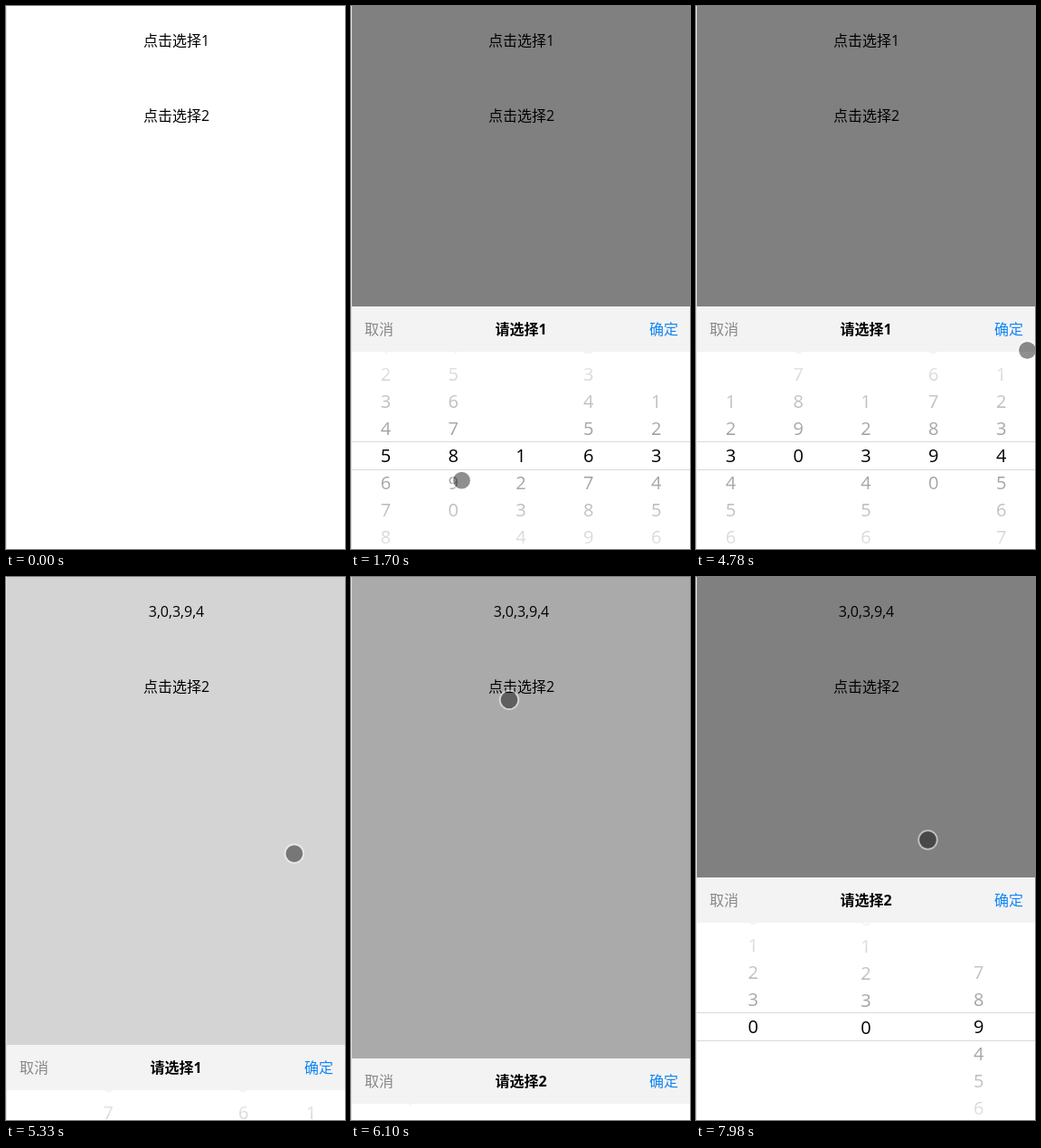
An HTML page with a canvas that plays this animation: 375 by 600 pixels, repeating every 8 s.

```html
<!DOCTYPE html>
<html lang="zh-CN">
<head>
<meta charset="utf-8">
<title>选择器</title>
<style>
  html, body { margin: 0; width: 100%; height: 100%; overflow: hidden; background: #fff; }
  canvas { display: block; }
</style>
</head>
<body>
<canvas id="stage" width="375" height="600"></canvas>
<script>
const ctx = document.getElementById('stage').getContext('2d');
const W = 375, H = 600, LOOP = 8000;
const FAMILY = '"Open Sans", "Noto Sans CJK SC", "Noto Sans CJK", sans-serif';

// The screen refreshes in fixed steps; all times below are in steps.
const STEP = 77.4, FIRST = 132;
const SLIDE = 3.9, FADE_LEAD = .75, DRAG = 3;

const PANEL_TOP = 332, PANEL_H = 280, HEAD = 50, ROW = 30, MID = 165;

// "drags" holds the start time of each column's drag.
const pickers = [
  { title: '请选择1', items: '1234567890', from: '58163', to: '30394',
    drags: [30, 21.5, 41.5, 47, 53.5], open: 11.235, close: 65.5 },
  { title: '请选择2', items: '7894561230', from: '249', to: '009',
    drags: [86.5, 92.5], open: 76.235, close: Infinity }
];

const clamp = v => Math.max(0, Math.min(1, v));
const mix = (a, b, p) => a + (b - a) * p;
const easeOut = p => 1 - (1 - p) ** 3;
const smooth = p => p * p * (3 - 2 * p);

// CSS "ease": cubic-bezier(.25, .1, .25, 1)
function ease(x) {
  x = clamp(x);
  const bez = (a, b, u) => 3 * a * u * (1 - u) ** 2 + 3 * b * u * u * (1 - u) + u ** 3;
  let lo = 0, hi = 1;
  for (let i = 0; i < 20; i++) {
    const u = (lo + hi) / 2;
    if (bez(.25, .25, u) < x) lo = u; else hi = u;
  }
  return bez(.1, 1, lo);
}

const columnX = (p, c) => 1 + (W - 1) * (c + .5) / p.from.length;
const columnRows = (p, c) => [p.from, p.to].map(s => p.items.indexOf(s[c]));

// Longer flicks take longer to settle.
function columnPos(p, c, k) {
  const [a, b] = columnRows(p, c);
  return c in p.drags ? mix(a, b, easeOut(clamp((k - p.drags[c]) / (4 + Math.abs(b - a))))) : a;
}

// The pointer visits a few spots [step, x, y] and drags over each column.
const spots = [
  [0, 285.5, 352.5], [5, 171.5, 25.5], [10, 175.5, 37.5], [12, 195.5, 136.5],
  [36, 155.5, 533.5], [60, 366.5, 380.5], [64, 357, 357.5],
  [74, 180.5, 117.5], [76, 180.5, 117.5], [83, 80.5, 448.5], [101, 256.5, 290.5]
];
const path = [...spots, ...pickers.flatMap(p => p.drags.flatMap((start, c) => {
  const [a, b] = columnRows(p, c);
  const x = columnX(p, c) + 4, reach = Math.sign(b - a) * 55;
  const y = PANEL_TOP + MID;
  return [[start, x, y + reach], [start + DRAG, x, y - reach]];
}))].sort((a, b) => a[0] - b[0]);

function text(str, x, y, color = '#000', size = 16, align = 'center', weight = 400) {
  ctx.font = `${weight} ${size}px ${FAMILY}`;
  ctx.textAlign = align;
  ctx.fillStyle = color;
  ctx.fillText(str, x, y);
}

function rect(x, y, w, h, fill) {
  ctx.fillStyle = fill;
  ctx.fillRect(x, y, w, h);
}

function veil(y, h, from, to) {
  const g = ctx.createLinearGradient(0, y, 0, y + h);
  g.addColorStop(0, `rgba(255,255,255,${from})`);
  g.addColorStop(1, `rgba(255,255,255,${to})`);
  rect(1, y, W - 1, h, g);
}

function drawWheels(p, top, k) {
  const mid = top + MID;
  ctx.save();
  ctx.beginPath();
  ctx.rect(1, top + HEAD, W - 1, PANEL_H - HEAD);
  ctx.clip();
  for (let c = 0; c < p.from.length; c++) {
    const pos = columnPos(p, c, k);
    [...p.items].forEach((d, i) =>
      text(d, columnX(p, c), Math.round(mid + (i - pos) * ROW) + 7, '#000', 20));
  }
  veil(top + HEAD, 99, .95, .6);
  veil(mid + 16, 99, .6, .95);
  for (const dy of [-16, 15]) rect(1, mid + dy, W - 1, 1, '#d9d9d9');
  ctx.restore();
}

function drawPicker(p, k) {
  const gone = ease((k - p.close) / SLIDE);
  const shade = ease((k - p.open + FADE_LEAD) / SLIDE) - gone;
  const shown = ease((k - p.open) / SLIDE) - gone;
  if (shade > 0) rect(1, 0, W - 1, H, `rgba(0,0,0,${shade / 2})`);
  if (shown <= 0) return;

  const top = Math.round(PANEL_TOP + (1 - shown) * PANEL_H);
  rect(1, top, W - 1, PANEL_H, '#fff');
  drawWheels(p, top, k);
  rect(1, top, W - 1, HEAD, '#f3f3f3');
  text('取消', 15, top + 31, '#888', 16, 'left');
  text(p.title, 188, top + 31, '#000', 16, 'center', 700);
  text('确定', 362, top + 31, '#0f86f5', 16, 'right');
}

function drawPointer(k) {
  const next = Math.max(1, path.findIndex(s => s[0] > k));
  const [k0, x0, y0] = path[next - 1], [k1, x1, y1] = path[next];
  const p = smooth(clamp((k - k0) / (k1 - k0)));
  const x = mix(x0, x1, p), y = mix(y0, y1, p);
  ctx.beginPath();
  ctx.arc(x, y, 9.5, 0, 7);
  ctx.fillStyle = 'rgba(0,0,0,.44)';
  ctx.fill();
  ctx.beginPath();
  ctx.arc(x, y, 10.3, 0, 7);
  ctx.lineWidth = 1.8;
  ctx.strokeStyle = 'rgba(255,255,255,.5)';
  ctx.stroke();
}

function draw(t) {
  const k = Math.min(Math.floor((t - FIRST) / STEP), path.at(-1)[0] - .01);
  const [first] = pickers;
  rect(0, 0, W, H, '#fff');
  rect(0, 0, 1, H, '#e2e2e2');
  text(k < first.close ? '点击选择1' : [...first.to].join(), 188.5, 44);
  text('点击选择2', 188.5, 127);
  pickers.forEach(p => drawPicker(p, k));
  if (t >= 160) drawPointer(k);
}

const began = performance.now();
function tick() {
  draw((performance.now() - began) % LOOP);
  requestAnimationFrame(tick);
}
tick();
</script>
</body>
</html>
```
